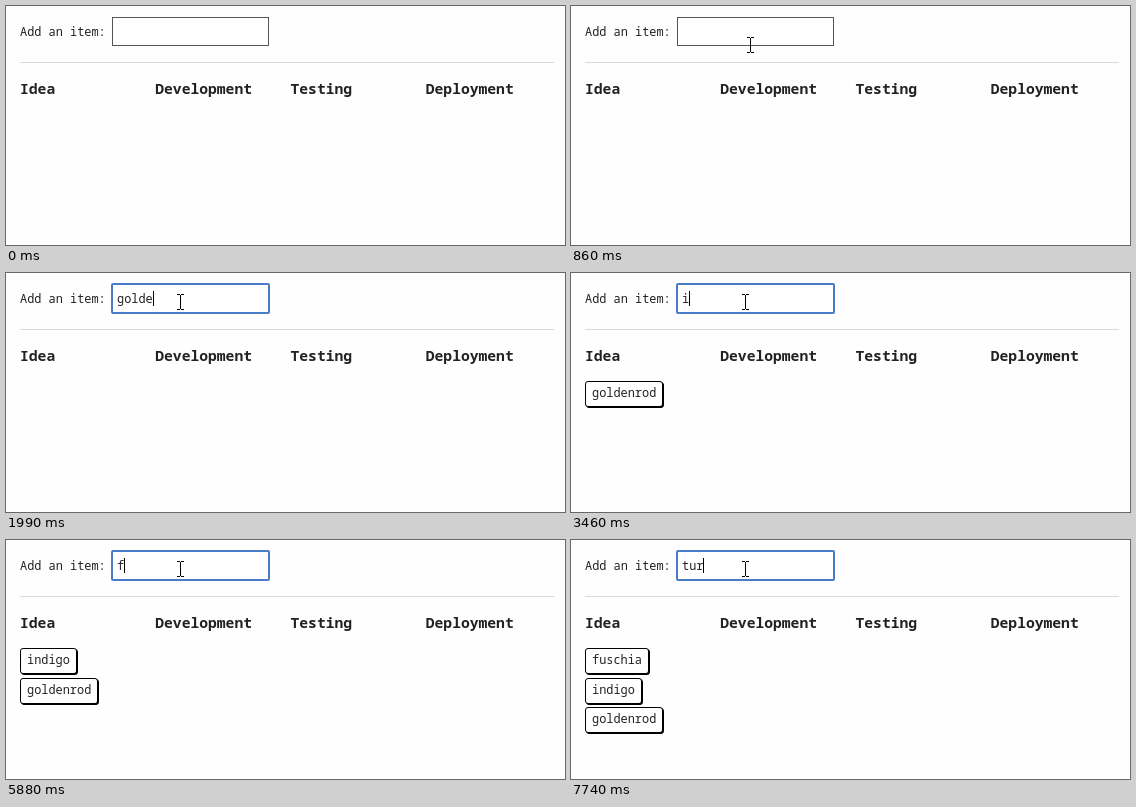
Write an HTML page that moves like this. It is 559 px wide and 239 px high and loops after 8 s.

```html
<!DOCTYPE html>
<html lang="en">
<head>
<meta charset="utf-8">
<title>Item board</title>
<style>
  html, body { margin: 0; width: 100%; height: 100%; overflow: hidden; background: #fefefe; }
  svg { display: block; width: 559px; height: 239px; }
  text { font: 11.91px "Noto Sans Mono", monospace; fill: #222; white-space: pre; }
  .head { font-size: 14.66px; font-weight: 700; }
  .card rect { fill: #fff; stroke: #000; }
  .card .shadow { fill: #000; }
</style>
</head>
<body>
<svg viewBox="0 0 559 239">
  <text x="14" y="30">Add an item:</text>
  <rect id="box" fill="#fff"/>
  <text id="entry" x="111" y="30"></text>
  <rect id="caret" y="18" width="1" height="15"/>
  <rect x="14" y="56" width="534" height="1" fill="#d9d9d9"/>
  <g id="heads"></g>
  <g id="cards"></g>
  <path id="beam" d="M-3-7.5H0M1-7.5H4M-3 7.5H0M1 7.5H4M.5-7V7" fill="none" stroke="#000"/>
  <path id="arrow" d="M.5.5V16.5L4.2 13 6.8 18.5 9 17.5 6.5 12H11.5Z" fill="#fff" stroke="#000"/>
</svg>
<script>
const LOOP = 8000, ADVANCE = 7.147, TEXT_X = 111;
const $ = id => document.getElementById(id);

// [start ms, typed text, caret visible, cards on the board]
const states = [
  [0, '', 0, 0], [1190, '', 1, 0],
  [1530, 'g', 1, 0], [1710, 'go', 1, 0], [1780, 'gol', 1, 0], [1840, 'gold', 1, 0],
  [1990, 'golde', 1, 0], [2110, 'golden', 1, 0], [2200, 'goldenr', 1, 0],
  [2300, 'goldenro', 1, 0], [2390, 'goldenrod', 1, 0], [2920, 'goldenrod', 0, 0],
  [3040, '', 1, 1], [3460, 'i', 1, 1], [3980, 'i', 0, 1],
  [4100, 'indig', 1, 1], [4240, 'indigo', 1, 1],
  [4520, '', 1, 2], [5070, '', 0, 2],
  [5830, 'f', 1, 2], [5930, 'fu', 1, 2], [6020, 'fusc', 1, 2],
  [6110, 'fuschi', 1, 2], [6210, 'fuschia', 1, 2],
  [6320, '', 1, 3], [6830, '', 0, 3],
  [7390, '', 1, 3], [7420, 't', 1, 3], [7740, 'tur', 1, 3]
];
const items = ['goldenrod', 'indigo', 'fuschia'];

$('heads').innerHTML = ['Idea', 'Development', 'Testing', 'Deployment']
  .map((name, i) => `<text class="head" x="${14 + 135.25 * i}" y="88">${name}</text>`).join('');

$('cards').innerHTML = items.map(name => {
  const size = `width="${Math.round(name.length * ADVANCE) + 13}" height="25" rx="2.5"`;
  return `<g class="card"><rect class="shadow" x="15.5" y="1.5" ${size}/>
    <rect x="14.5" y=".5" ${size}/><text x="21" y="16">${name}</text></g>`;
}).join('');
const cards = [...$('cards').children];

function set(el, attrs) {
  for (const key in attrs) el.setAttribute(key, attrs[key]);
}

function show(el, on) {
  el.style.display = on ? '' : 'none';
}

function drawBox(focused) {
  set($('box'), focused
    ? { x: 106, y: 11, width: 157, height: 29, rx: 1, stroke: '#4a7bc8', 'stroke-width': 2 }
    : { x: 106.5, y: 11.5, width: 156, height: 28, rx: 0, stroke: '#555', 'stroke-width': 1 });
}

// The pointer slows down as it reaches the input, in 44 ms steps.
function drawPointer(t) {
  const left = 1 - Math.min(15, Math.max(0, Math.floor((t - 370) / 44))) / 15;
  const x = Math.round(174 + 61 * left ** 1.9);
  const y = Math.round(29 + 168 * left ** 2.15);
  const inside = y < 40;
  show($('beam'), t >= 370 && inside);
  show($('arrow'), t >= 370 && !inside);
  set(inside ? $('beam') : $('arrow'), { transform: `translate(${x} ${y})` });
}

function draw(t) {
  const [, typed, caretOn, count] = states.findLast(s => s[0] <= t);
  drawBox(t >= 1190);
  $('entry').textContent = typed;
  set($('caret'), { x: Math.round(TEXT_X + typed.length * ADVANCE) });
  show($('caret'), caretOn);
  cards.forEach((card, i) => {
    show(card, i < count);
    set(card, { transform: `translate(0 ${Math.round(108 + 29.5 * (count - 1 - i))})` });
  });
  drawPointer(t);
}

const start = performance.now();
function tick() {
  draw((performance.now() - start) % LOOP);
  requestAnimationFrame(tick);
}
tick();
</script>
</body>
</html>
```
